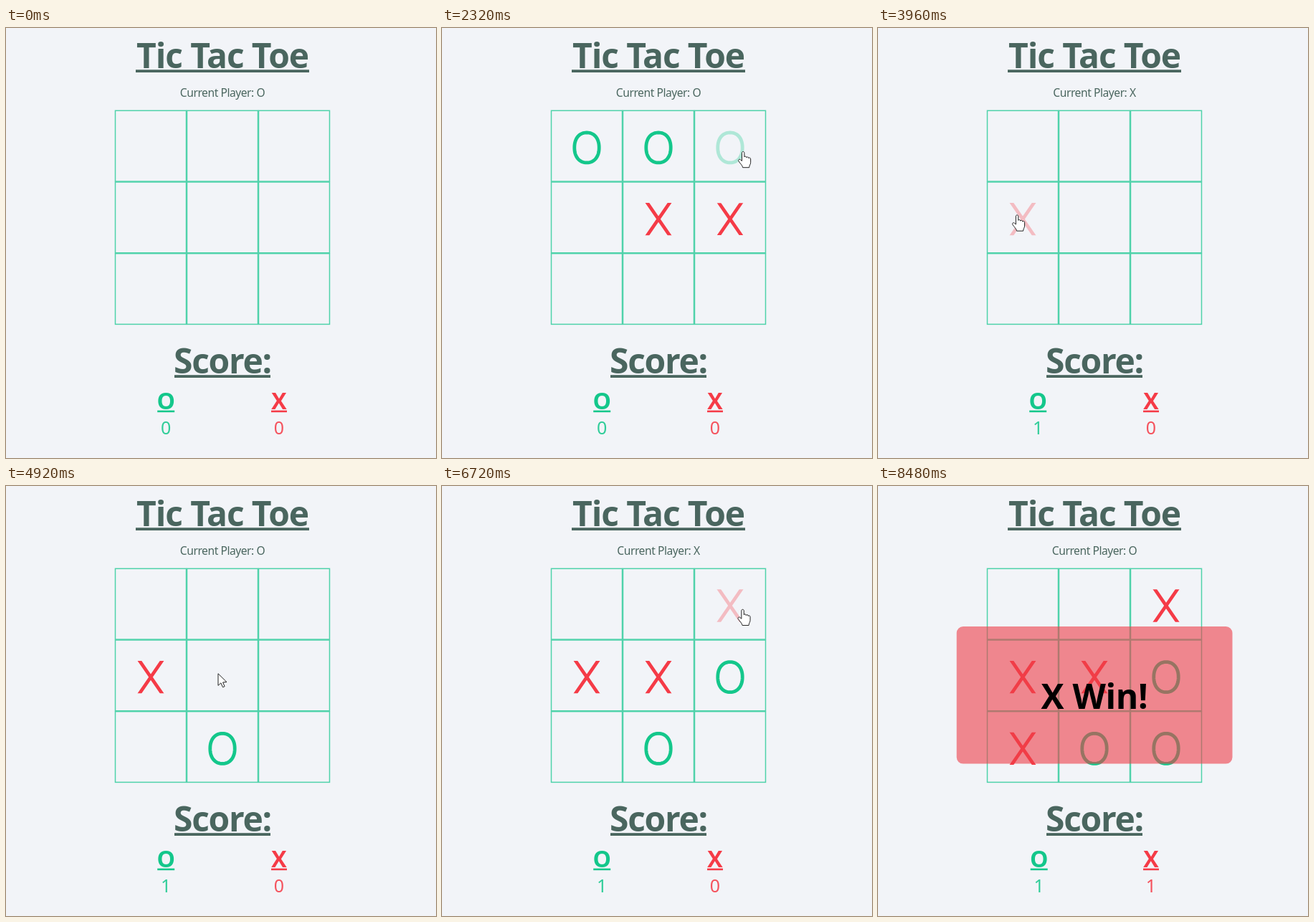
An HTML page with a canvas that plays this animation: 600x600 px, repeating every 8.52 s.

```html
<!DOCTYPE html>
<html lang="en">
<head>
<meta charset="utf-8">
<title>Tic Tac Toe</title>
<style>
  html, body { margin: 0; width: 100%; height: 100%; overflow: hidden; background: #f2f4f8; }
  canvas { display: block; width: 600px; height: 600px; }
</style>
</head>
<body>
<canvas id="stage"></canvas>
<script>
const LOOP = 8520, STEP = 40, POP = 260, FADE = 200, HOLD = 80, TRAVEL = 840;
const BG = '#f2f4f8', INK = '#4a665f', LINE = '#4fd2aa';
const COLOR = { O: '#14c78b', X: '#f53b47' };
const PANEL = { O: 'rgba(20,199,139,.7)', X: 'rgba(238,62,72,.6)' };
const LEFT = 152, TOP = 114.8, COL = 100, ROW = 99.7;

const clamp = v => Math.min(1, Math.max(0, v));
const ease = v => { v = clamp(v); return v * v * (3 - 2 * v); };
const other = player => player === 'O' ? 'X' : 'O';
const center = cell => ({ x: LEFT + (cell % 3 + .5) * COL, y: TOP + (Math.floor(cell / 3) + .5) * ROW });

// A run of clicks at an even pace; each digit is a cell.
const run = (start, pace, cells) =>
  [...cells].map((cell, i) => ({ time: start + i * pace, cell: +cell }));

const games = [
  { from: 0, first: 'O', winner: 'O', open: 2520, moves: run(1120, 320, '04152') },
  { from: 3560, first: 'X', winner: 'X', open: 7960,
    moves: [...run(4200, 360, '374'), ...run(6360, 440, '52'), ...run(7520, 360, '86')] }
];

// The pointer clicks each cell a little off centre, swaying from move to move.
const clicks = games.flatMap(g => g.moves).map(({ time, cell }, i) => {
  const sway = -23 * Math.cos(1.265 * (i - 1)), { x, y } = center(cell);
  return { time, x: x + sway, y: y + .43 * sway };
});
const stops = [{ time: 240, x: 608, y: 400 }, ...clicks, { time: 3040, x: 283, y: 350 }]
  .sort((a, b) => a.time - b.time);

function pointerAt(t) {
  const i = stops.findLastIndex(s => t >= s.time + HOLD);
  if (i < 0 || t > stops.at(-1).time + 280) return null;
  const a = stops[i], b = stops[i + 1] || a;
  const leave = a.time + HOLD, arrive = Math.min(b.time - HOLD, leave + TRAVEL);
  const k = a === b ? 1 : ease((t - leave) / (arrive - leave));
  return { x: a.x + (b.x - a.x) * k, y: a.y + (b.y - a.y) * k };
}

function cellAt({ x, y }) {
  const col = Math.floor((x - LEFT) / COL), row = Math.floor((y - TOP) / ROW);
  return col >= 0 && col < 3 && row >= 0 && row < 3 ? row * 3 + col : -1;
}

const canvas = document.getElementById('stage');
const ctx = canvas.getContext('2d');
const ratio = window.devicePixelRatio || 1;
canvas.width = canvas.height = 600 * ratio;

function text(str, x, y, size, color, weight, spacing = 0) {
  ctx.font = `${weight} ${size}px "Noto Sans", "Open Sans", sans-serif`;
  ctx.letterSpacing = spacing + 'px';
  ctx.textAlign = 'center';
  ctx.fillStyle = color;
  ctx.fillText(str, x, y);
}

function bar(x, y, w, h, color) {
  ctx.fillStyle = color;
  ctx.fillRect(x, y, w, h);
}

function heading(str, y, width, spacing) {
  text(str, 302, y, 48, INK, 700, spacing);
  bar(302 - width / 2, y + 2.2, width, 3.8, INK);
}

function mark(player, cell, scale, alpha) {
  if (scale <= 0) return;
  const { x, y } = center(cell);
  ctx.save();
  ctx.translate(x, y);
  ctx.scale(scale, scale);
  ctx.translate(0, 2.3);
  ctx.globalAlpha = alpha;
  ctx.beginPath();
  if (player === 'O') {
    const bend = v => Math.sign(v) * Math.abs(v) ** .91;
    for (let a = 0; a < 2 * Math.PI; a += Math.PI / 36) {
      ctx.lineTo(17.2 * bend(Math.cos(a)), 21 * bend(Math.sin(a)));
    }
    ctx.closePath();
    ctx.lineWidth = 4.8;
    ctx.strokeStyle = COLOR.O;
  } else {
    ctx.rect(-22, -22.7, 44, 45.4);
    ctx.clip();
    ctx.beginPath();
    for (const side of [-1, 1]) {
      ctx.moveTo(-17.2 * side, -25);
      ctx.lineTo(17.2 * side, 25);
    }
    ctx.lineWidth = 4.7;
    ctx.strokeStyle = COLOR.X;
  }
  ctx.stroke();
  ctx.restore();
}

const arrow = new Path2D('M0 0V16.6L3.9 13.1L6.5 19L9.1 17.9L6.6 12.2L12 11.8Z');
const hand = new Path2D('M-1.8 13V1.8C-1.8-.6 1.6-.6 1.6 1.8V7.4C2 6.2 4.6 6.2 4.6 8.3' +
  'C5.2 6.8 7.6 7.2 7.6 9.2C8.2 8 10.4 8.4 10.4 10.4V15C10.4 18 8.6 18.6 8.4 22.2H-.6' +
  'C-1 19-4.4 16.6-6.4 13.2C-7.4 11.2-5 10-3.6 11.4Z');

function drawPointer({ x, y }, isHand) {
  const shape = isHand ? hand : arrow;
  ctx.save();
  ctx.translate(x, y);
  ctx.lineJoin = 'round';
  ctx.lineWidth = 1;
  ctx.fillStyle = '#fff';
  ctx.strokeStyle = '#222';
  ctx.fill(shape);
  ctx.stroke(shape);
  ctx.restore();
}

function drawGrid() {
  ctx.strokeStyle = LINE;
  ctx.lineWidth = 1.5;
  for (let cell = 0; cell < 9; cell++) {
    const { x, y } = center(cell);
    ctx.strokeRect(x - COL / 2 + .5, y - ROW / 2 + .5, COL - 1, ROW - 1);
  }
}

function drawScore(player, x, wins) {
  const half = player === 'O' ? 12 : 11;
  text(player, x, 531.5, 32, COLOR[player], 700);
  bar(x - half, 533.6, half * 2, 2.6, COLOR[player]);
  ctx.globalAlpha = .88;
  text(wins, x, 567, 25, COLOR[player], 300);
  ctx.globalAlpha = 1;
}

function drawPanel(winner, alpha) {
  ctx.globalAlpha = alpha;
  ctx.fillStyle = PANEL[winner];
  ctx.beginPath();
  ctx.roundRect(109.7, 196, 384.8, 191.6, 9);
  ctx.fill();
  text(winner + ' Win!', 302, 311, 48, '#000', 700, -.3);
  ctx.globalAlpha = 1;
}

function draw(t) {
  const game = games.findLast(g => t >= g.from);
  const played = game.moves.filter(m => t >= m.time);
  const turn = i => i % 2 ? other(game.first) : game.first;
  const player = turn(played.length);
  const wins = who => games.filter(g => g.winner === who && t >= g.moves.at(-1).time).length;
  const pointer = pointerAt(t);
  const cell = pointer ? cellAt(pointer) : -1;
  const free = cell >= 0 && t < game.open && !played.some(m => m.cell === cell);

  ctx.setTransform(ratio, 0, 0, ratio, 0, 0);
  bar(0, 0, 600, 600, BG);
  heading('Tic Tac Toe', 56, 242, -1.1);
  text('Current Player: ' + player, 302, 95.7, 15.6, INK, 300, -.45);
  drawGrid();
  heading('Score:', 482, 134, -1.3);
  drawScore('O', wins('X') ? 224.7 : 223.2, wins('O'));
  drawScore('X', 381, wins('X'));

  played.forEach((m, i) => mark(turn(i), m.cell, ease((t - m.time) / POP), 1));
  if (free) mark(player, cell, 1, .3);
  if (t >= game.open) drawPanel(game.winner, ease((t - game.open + STEP) / FADE));
  if (pointer) drawPointer(pointer, free);
}

function tick() {
  draw(Math.floor(performance.now() % LOOP / STEP) * STEP);
  requestAnimationFrame(tick);
}
tick();
</script>
</body>
</html>
```
